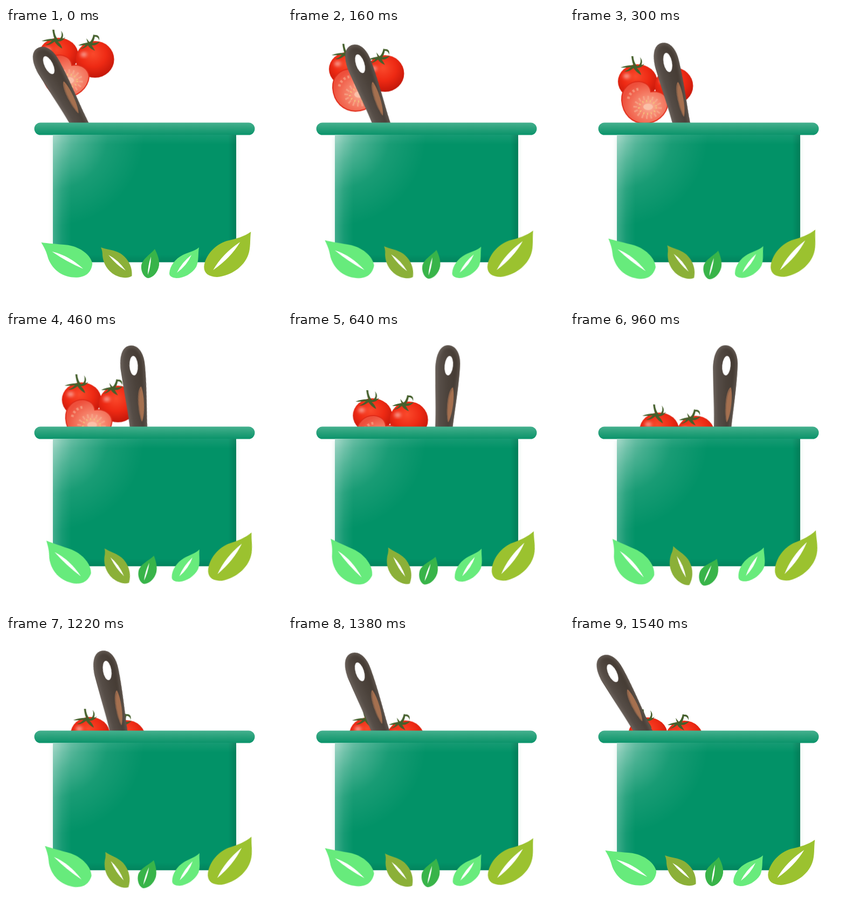
Recreate the animation shown at these times as an HTML page. Size 512 by 512 pixels, loop 1560 ms.

```html
<!DOCTYPE html>
<html lang="en">
<head>
<meta charset="utf-8">
<title>Cooking pot</title>
<style>
  html, body { margin: 0; width: 100%; height: 100%; overflow: hidden; background: #fff; }
  svg { display: block; width: 100vw; height: 100vh; }

  .move { transform-box: view-box; transform-origin: 0 0; animation: 1560ms linear infinite; }
  .tomatoes { animation-name: drop; }
  .spoon { animation-name: stir; }
  .early { animation-name: early; }
  .mid { animation-name: mid; }
  .late { animation-name: late; }
  .vein { fill: #fff; }

  @keyframes drop {
    0% { transform: translate(0, 0); }
    51.28% { transform: translate(74px, 131px); }
    98.72%, 100% { transform: translate(47px, 133px); }
  }
  @keyframes stir {
    0%, 98.72%, 100% { transform: translate(79px, 69px) rotate(-32.3deg); }
    19.23% { transform: translate(181px, 64px) rotate(-17.2deg); }
    29.49% { transform: translate(236.5px, 62.5px) rotate(-9.1deg); }
    41.03% { transform: translate(298px, 62.5px) rotate(0deg); }
    51.28% { transform: translate(352px, 64px) rotate(8deg); }
    61.54% { transform: translate(290.5px, 62.5px) rotate(-.9deg); }
    78.21% { transform: translate(188px, 64px) rotate(-15.2deg); }
  }
  /* Leaves share one swing with different turning points. */
  @keyframes early {
    0%, 98.72%, 100% { transform: translate(0, 0) rotate(0deg); }
    51.28% { transform: var(--to); }
  }
  @keyframes mid {
    0%, 98.72%, 100% { transform: translate(0, 0) rotate(0deg); }
    56.41% { transform: var(--to); }
  }
  @keyframes late {
    0%, 98.72%, 100% { transform: translate(0, 0) rotate(0deg); }
    62.18% { transform: var(--to); }
  }
</style>
</head>
<body>
<svg viewBox="0 0 512 512" xmlns="http://www.w3.org/2000/svg">
  <defs>
    <radialGradient id="skin" cx=".45" cy=".35" r=".7">
      <stop offset="0" stop-color="#fa4a2c"/>
      <stop offset=".5" stop-color="#ee2a14"/>
      <stop offset="1" stop-color="#bd1408"/>
    </radialGradient>
    <radialGradient id="flesh" cx=".6" cy=".58" r=".6">
      <stop offset="0" stop-color="#fbb297"/>
      <stop offset=".45" stop-color="#f6826a"/>
      <stop offset="1" stop-color="#ee4f3b"/>
    </radialGradient>
    <radialGradient id="shine" gradientUnits="userSpaceOnUse" cx="87" cy="198" r="170">
      <stop offset="0" stop-color="#fff" stop-opacity=".5"/>
      <stop offset=".3" stop-color="#fff" stop-opacity=".27"/>
      <stop offset=".6" stop-color="#fff" stop-opacity=".09"/>
      <stop offset="1" stop-color="#fff" stop-opacity="0"/>
    </radialGradient>
    <linearGradient id="leftLight">
      <stop offset="0" stop-color="#fff" stop-opacity=".24"/>
      <stop offset=".5" stop-color="#fff" stop-opacity=".08"/>
      <stop offset="1" stop-color="#fff" stop-opacity="0"/>
    </linearGradient>
    <linearGradient id="topLight" x2="0" y2="1">
      <stop offset="0" stop-color="#fff" stop-opacity=".08"/>
      <stop offset="1" stop-color="#fff" stop-opacity="0"/>
    </linearGradient>
    <linearGradient id="rightDark">
      <stop offset="0" stop-opacity="0"/>
      <stop offset="1" stop-opacity=".14"/>
    </linearGradient>
    <linearGradient id="lowDark" x2="0" y2="1">
      <stop offset="0" stop-opacity="0"/>
      <stop offset="1" stop-opacity=".1"/>
    </linearGradient>
    <linearGradient id="rim" x2="0" y2="1">
      <stop offset="0" stop-color="#45b08e"/>
      <stop offset=".5" stop-color="#27a17a"/>
      <stop offset="1" stop-color="#0a936a"/>
    </linearGradient>
    <linearGradient id="wood">
      <stop offset="0" stop-color="#5d544e"/>
      <stop offset=".5" stop-color="#4b423b"/>
      <stop offset="1" stop-color="#423830"/>
    </linearGradient>
    <filter id="soft" x="-20%" y="-20%" width="140%" height="140%">
      <feGaussianBlur stdDeviation="3"/>
    </filter>
    <path id="handle" d="M-2 -38C13 -38 21 -23 21 -4C20 25 14 66 8 108L2 160H-23L-25 114C-23.500 82 -25 50 -25 10C-25 -14 -19 -37 -2 -38Z"/>
    <clipPath id="handleClip"><use href="#handle"/></clipPath>
  </defs>

  <g class="move tomatoes">
    <ellipse cx="97.5" cy="50" rx="36.5" ry="32" fill="url(#skin)"/>
    <ellipse cx="165" cy="58" rx="35.5" ry="34" fill="url(#skin)"/>
    <g fill="#fff" opacity=".6" filter="url(#soft)">
      <ellipse cx="77" cy="40" rx="6" ry="4"/>
      <ellipse cx="144" cy="49" rx="6" ry="4"/>
    </g>
    <g fill="#45602c">
      <path d="M66 24Q80 19 91 20Q100 23 110 17Q105 25 96 25Q103 31 104 38Q94 32 90 25Q80 33 73 31Q82 28 85 23Q75 25 66 24Z"/>
      <path d="M86 3L89.500 3Q90 13 96 21L91 23Q87 14 86 3Z"/>
      <path d="M98 22Q106 14 102 5Q110 14 101 24Z"/>
      <path d="M134 32Q144 27 154 27Q163 29 174 25Q168 33 159 32L165 42Q155 38 152 32Q144 39 137 39Q146 35 147 31Q140 33 134 32Z"/>
      <path d="M153 28Q160 23 162 12L165 13Q164 24 158 30Z"/>
      <path d="M149 19Q153 24 157 29L153 30Q150 25 149 19ZM164 13Q174 11 173 24Q171 15 164 16Z"/>
    </g>
    <path d="M68 85C67 62 84 49 101 50C115 52 121 59 122 69C140 66 153 76 154 90C152 112 132 128 110 128C88 127 70 112 68 85Z" fill="url(#flesh)" stroke="#e02c1a" stroke-width="2"/>
    <g fill="none" stroke="#f9b394">
      <ellipse cx="116" cy="98" rx="23" ry="18" stroke-width="7" stroke-dasharray="3 5" opacity=".6"/>
      <ellipse cx="116" cy="98" rx="16" ry="12" stroke="#f4c07c" stroke-width="4" stroke-dasharray="2 5"/>
      <path d="M80 82Q84 67 99 64" stroke-width="5" stroke-dasharray="4 4" opacity=".6"/>
    </g>
    <ellipse cx="117" cy="97" rx="9" ry="6" fill="#fbc0a8"/>
  </g>

  <g class="move spoon">
    <use href="#handle" fill="url(#wood)"/>
    <g clip-path="url(#handleClip)">
      <use href="#handle" fill="none" stroke="#736a63" stroke-width="4" filter="url(#soft)"/>
    </g>
    <ellipse rx="7.800" ry="18" transform="rotate(6)" fill="#fff"/>
    <path d="M7.500 40C11.500 52 8 90 -1 105C-5.500 95 -4 47 7.500 40Z" fill="#a5704f"/>
    <path d="M6 44C-3 57 -3.500 90 -1.500 102" fill="none" stroke="#84604a" stroke-width="1.500"/>
  </g>

  <g>
    <path d="M85 202V432H429V202" fill="#9fcfbe" opacity=".25" filter="url(#soft)"/>
    <rect x="52.500" y="175.500" width="409" height="23" rx="11.500" fill="url(#rim)"/>
    <rect x="87" y="198" width="340" height="236.500" fill="#029267"/>
    <rect x="87" y="198" width="340" height="236.500" fill="url(#shine)"/>
    <rect x="87" y="198" width="34" height="236.500" fill="url(#leftLight)"/>
    <rect x="87" y="198" width="340" height="18" fill="url(#topLight)"/>
    <rect x="412" y="198" width="15" height="236.500" fill="url(#rightDark)"/>
    <rect x="87" y="420" width="340" height="14.500" fill="url(#lowDark)"/>
  </g>

  <g class="move early" style="transform-origin:114.3px 431.7px;--to:translate(0,0) rotate(24deg)">
    <g transform="translate(-.7 -.3)">
      <path fill="#67eb7c" d="M66 398C78 400 96 401 116 403C140 407 158 422 161 437C159 456 146 463 130 463C108 463 88 451 79 428C76 416 72 408 66 398Z"/>
      <path class="vein" d="M86 415Q117 422 144 447Q113 434 86 415Z"/>
    </g>
  </g>
  <g class="move late" style="transform-origin:206px 437px;--to:translate(0,0) rotate(25deg)">
    <path fill="#8bb038" d="M176 407C186 411 200 411 212 418C226 427 235 443 233.500 460C224 466 208 463 197 455C184 445 180 432 179 422C179 416 178 411 176 407Z"/>
    <path class="vein" d="M190 421Q208 430 222 450Q205 440 190 421Z"/>
  </g>
  <g class="move late" style="transform-origin:267px 438px;--to:translate(-10px,8px) rotate(14deg)">
    <path fill="#38b449" d="M276 410C281 420 285 430 284 440C282 454 272 463 264 464C256 463 250 452 251 441C253 428 268 420 276 410Z"/>
    <path class="vein" d="M269 424Q268.500 444 263 458Q263 441 269 424Z"/>
  </g>
  <g class="move late" style="transform-origin:331px 437px;--to:translate(6.5px,-3.5px) rotate(-9deg)">
    <path fill="#68eb7c" d="M358 407C356 420 358 432 353 443C345 456 330 464 316 464C307 463 303 460 303 455C304 441 314 428 328 421C338 416 350 414 358 407Z"/>
    <path class="vein" d="M344 421Q336 440 317 454Q326 435 344 421Z"/>
  </g>
  <g class="move mid" style="transform-origin:408.8px 423px;--to:translate(10.7px,-4px) rotate(-10.200deg)">
    <g transform="translate(-.7 0)">
      <path fill="#9bc22f" d="M455 378C453 392 455 408 450 421C442 443 418 460 392 462C376 461 368 455 368 443C370 422 388 402 410 395C428 391 442 387 455 378Z"/>
      <path class="vein" d="M435 397Q418 426 385 449Q402 419 435 397Z"/>
    </g>
  </g>
</svg>
</body>
</html>
```
